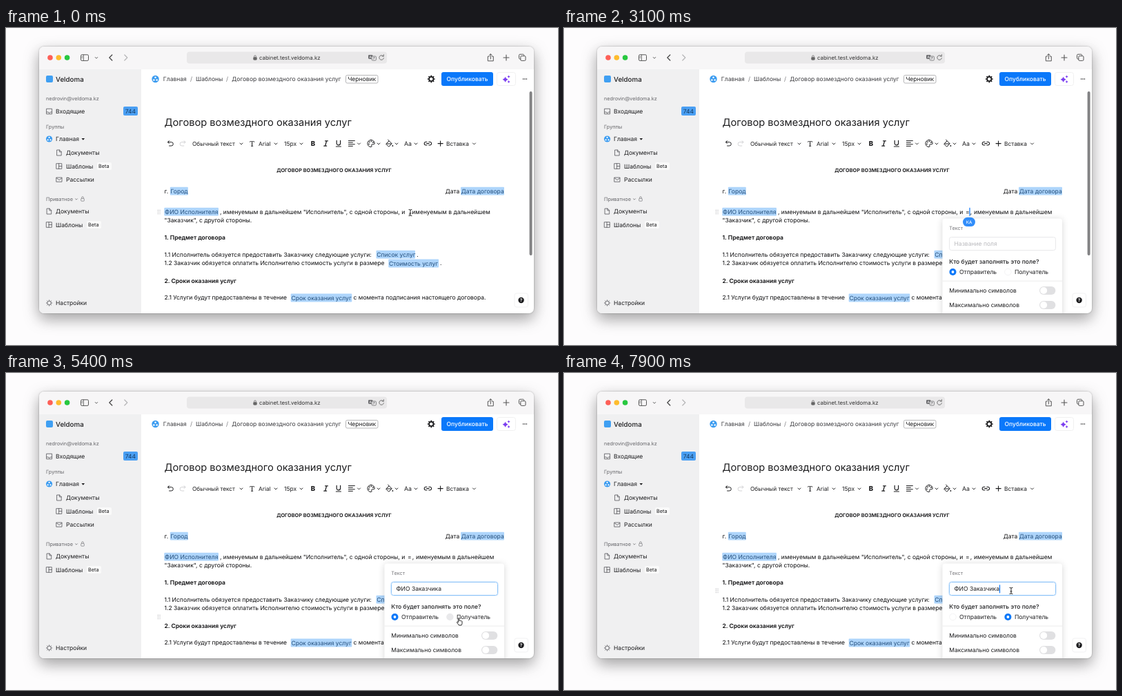
An HTML page that plays this animation: 800 by 460 pixels, repeating every 8000 ms.

```html
<!DOCTYPE html>
<html lang="ru">
<head>
<meta charset="utf-8">
<title>Шаблон договора</title>
<style>
  html, body { margin: 0; width: 800px; height: 460px; overflow: hidden; background: #fdfcfd; }
  svg { display: block; }
  text { font-family: Inter, "Noto Sans", sans-serif; white-space: pre; text-rendering: geometricPrecision; }
  .window { filter: drop-shadow(0 8px 11px rgba(0,0,0,.3)) drop-shadow(0 0 1px rgba(0,0,0,.3)); }
  .panel { filter: drop-shadow(0 1px 5px rgba(0,0,0,.16)); }
</style>
</head>
<body>
<svg id="stage" width="800" height="460" viewBox="0 0 800 460">
  <defs><clipPath id="frame"><rect x="48" y="27" width="717" height="387" rx="7"/></clipPath></defs>
</svg>
<script>
const NS = 'http://www.w3.org/2000/svg';
const LOOP = 8000;
const INK = '#1d1d1f', GREY = '#77777b', BLUE = '#0a78fa', TAG = '#aed5fb';
const BASE = 8.54, SMALL = 7.32;
const stage = document.getElementById('stage');
let parent = stage;

function add(tag, attrs, content) {
  const el = document.createElementNS(NS, tag);
  for (const key in attrs) el.setAttribute(key, attrs[key]);
  if (content !== undefined) el.textContent = content;
  return parent.appendChild(el);
}

function group(attrs, build) {
  const outer = parent;
  const el = parent = add('g', attrs);
  build();
  parent = outer;
  return el;
}

// y is the middle of the capital letters
function label(x, y, str, size = BASE, fill = INK, weight = 400, more = {}) {
  return add('text', { x, y: y + size * .36, 'font-size': size, fill, 'font-weight': weight, ...more }, str);
}

const box = (x, y, width, height, fill, rx = 0, more = {}) =>
  add('rect', { x, y, width, height, fill, rx, ...more });
const dot = (cx, cy, r, fill, more = {}) => add('circle', { cx, cy, r, fill, ...more });
const line = (d, stroke = INK, width = 1, more = {}) =>
  add('path', { d, fill: 'none', stroke, 'stroke-width': width, 'stroke-linecap': 'round', 'stroke-linejoin': 'round', ...more });
const chevron = (x, y, color = INK, s = 2) => line(`M${x - s} ${y - s / 2}l${s} ${s}l${s} ${-s}`, color, .9);

function tag(x, y, w, str) {
  box(x, y - 5.8, w, 11.8, TAG, 1);
  label(x + .8, y + .3, str, BASE, '#244f7c');
}

function gear(x, y, r, color, width) {
  dot(x, y, r * .66, 'none', { stroke: color, 'stroke-width': width });
  for (let i = 0; i < 8; i++) {
    const a = i * Math.PI / 4, c = Math.cos(a), s = Math.sin(a);
    line(`M${x + c * r * .8} ${y + s * r * .8}L${x + c * r} ${y + s * r}`, color, width);
  }
}

function lock(x, y, color, fill = 'none') {
  box(x - 2.3, y - .8, 4.6, 3.8, fill, .7, { stroke: color, 'stroke-width': .7 });
  line(`M${x - 1.4} ${y - 1}v-1a1.4 1.4 0 0 1 2.8 0v1`, color, .7);
}

function people(x, y, r) {
  dot(x, y, r, '#3c9cf0');
  for (const [dx, dy] of [[0, -.45], [-.42, .3], [.42, .3]]) dot(x + dx * r, y + dy * r, r * .24, '#fff');
}

const docIcon = (x, y) => line(`M${x - 3} ${y - 4}h3.6l2.6 2.6v5.4h-6.2zM${x + .4} ${y - 4}v2.8h2.8`, '#55555a', .8);
const gridIcon = (x, y) => line(`M${x - 3.8} ${y - 3.8}h7.6v7.6h-7.6zM${x - .4} ${y - 3.8}v7.6M${x - .4} ${y}h4.2`, '#55555a', .8);

function beta(x, y) {
  box(x, y - 5.5, 21, 11, '#fafafa', 2);
  label(x + 2, y, 'Beta', SMALL);
}

function drawTitleBar() {
  box(48, 27, 717, 33, '#f7f6f7');
  ['#fe5f57', '#febc2e', '#28c840'].forEach((c, i) => dot(64 + i * 12.3, 43, 3.8, c));
  box(108.5, 38.8, 11, 8.6, 'none', 1.6, { stroke: '#555', 'stroke-width': 1 });
  line('M112.4 39v8.2M110 41.3h1M110 43.2h1', '#555', .8);
  chevron(131, 43.3, '#555', 1.8);
  line('M153.8 39l-4 4l4 4', '#444', 1.2);
  line('M171.8 39l4 4l-4 4', '#b5b5b7', 1.2);
  box(262, 34.5, 290, 17, '#e9e8e9', 4);
  lock(361, 43.2, '#666', '#666');
  label(367, 43.3, 'cabinet.test.veldoma.kz', 7.9, '#333');
  box(525, 39, 6.5, 6, '#707073', 1.4);
  box(530, 41, 6.5, 6, '#e9e8e9', 1.4, { stroke: '#707073', 'stroke-width': .8 });
  label(526.4, 42, 'A', 5, '#fff');
  line('M532 43h2.6M533.3 42.2v.8M532 45.6l2-2.4', '#707073', .6);
  line('M547 41.2a3.3 3.3 0 1 0 .4 2.6M545 40.9h2.3v-2.3', '#666', .9);
  line('M700.3 41.2h-2v6.6h8v-6.6h-2M702.3 45v-7M700.3 39.6l2-2l2 2', '#555', 1);
  line('M721 43h8M725 39v8', '#555', 1.1);
  box(743.5, 38.2, 7.2, 6.8, 'none', 1.4, { stroke: '#555' });
  box(745.8, 40.6, 7.2, 6.8, '#f7f6f7', 1.4, { stroke: '#555' });
}

function drawSidebar() {
  box(48, 60, 148, 354, '#f0f0f1');
  box(58, 69, 10, 10, '#3f9ff2', 2);
  label(72, 74, 'Veldoma', 9.76, INK, 500);
  label(58, 102.3, 'nedrovin@veldoma.kz', SMALL, '#66666a');
  line('M59 117.2h7.6v7.6h-7.6zM59 122h2.2l.8 1.2h1.6l.8-1.2h2.2', '#55555a', .8);
  label(72, 121, 'Входящие');
  box(170, 114, 21, 13, '#4a9ff3', 2);
  label(180.4, 120.8, '744', BASE, '#16395f', 400, { 'text-anchor': 'middle' });
  label(58, 143, 'Группы', SMALL, '#66666a');
  people(62.6, 161, 4.6);
  label(72, 161, 'Главная');
  add('path', { d: 'M109.5 160h4.6l-2.3 2.7z', fill: INK });
  docIcon(77, 181);
  label(87, 181, 'Документы');
  gridIcon(77, 200.5);
  label(87, 200.5, 'Шаблоны');
  beta(132, 200.5);
  line('M73.2 217h7.8v6.2h-7.8zM73.2 217.6l3.9 3l3.9-3', '#55555a', .8);
  label(87, 220.3, 'Рассылки');
  label(58, 248.3, 'Приватное', SMALL, '#66666a');
  chevron(102, 248.5, '#77777b', 1.4);
  lock(111, 248.2, '#77777b');
  docIcon(62.5, 266);
  label(72, 266, 'Документы');
  gridIcon(62.5, 285.5);
  label(72, 285.5, 'Шаблоны');
  beta(117, 285.5);
  gear(62.6, 399, 4.2, '#55555a', .8);
  label(72, 399.3, 'Настройки');
}

function drawHeader() {
  people(216.5, 74, 5.2);
  label(227.8, 74, 'Главная', BASE, '#3a3a3e');
  label(267, 74, '/', BASE, GREY);
  label(275, 74, 'Шаблоны', BASE, '#3a3a3e');
  label(319, 74, '/', BASE, GREY);
  label(327.3, 74, 'Договор возмездного оказания услуг', BASE, '#3a3a3e');
  box(492.5, 68.5, 46.5, 11.5, '#fff', 2, { stroke: '#a5a5a8', 'stroke-width': .8 });
  label(515.8, 74.3, 'Черновик', BASE, INK, 400, { 'text-anchor': 'middle' });
  gear(616.3, 74, 4.7, INK, 1.7);
  box(631, 64, 75, 20, BLUE, 3);
  label(668.6, 74, 'Опубликовать', BASE, '#fff', 500, { 'text-anchor': 'middle' });
  box(711.5, 64.5, 27, 19, '#fff', 3, { stroke: '#ececee', 'stroke-width': .8 });
  for (const [x, y, s] of [[723.6, 74.8, 4], [728.6, 70.6, 2.2], [728.6, 78, 2]])
    add('path', { d: `M${x} ${y - s}q${s * .2} ${s * .8} ${s} ${s}q${-s * .8} ${s * .2} ${-s} ${s}q${-s * .2} ${-s * .8} ${-s} ${-s}q${s * .8} ${-s * .2} ${s} ${-s}z`, fill: '#7b3df0' });
  for (let i = 0; i < 3; i++) dot(749.6 + i * 2.4, 74, .8, INK);
}

function drawToolbar() {
  const y = 167.6;
  line('M236.4 163.6l-2 2l2 2M234.6 165.6h5a2.7 2.7 0 0 1 0 5.4h-3');
  line('M258 163.6l2 2l-2 2M259.8 165.6h-5a2.7 2.7 0 0 0 0 5.4h3', '#d2d2d4');
  label(270, y, 'Обычный текст', 8.3);
  label(353.3, y, 'T', 11, INK, 400, { style: 'font-family:"Noto Serif",serif' });
  label(366, y, 'Arial', 8.3);
  label(403, y, '15px', 8.5);
  label(441.8, y, 'B', 9.6, INK, 800);
  line('M462.6 163.8h3.8M460.8 171.2h3.8M464.6 163.8l-2 7.4', INK, 1.3);
  line('M479.2 163.4v3.8a2.7 2.7 0 0 0 5.4 0v-3.8M478.4 172h7', INK, 1.2);
  line('M496.4 163.6h9M496.4 166.2h6M496.4 168.8h9M496.4 171.4h6', INK, 1);
  line('M529 162.4a5 5 0 1 0 0 10.2q1.8-.6.8-2q-.6-1.6 1-1.8h2q1.6-.2 1.4-1.8a5.2 5 0 0 0-5.2-4.6', INK, 1);
  for (const [px, py] of [[526, 168.4], [526.6, 165.4], [529.4, 164.4], [532, 166]]) dot(px, py, .9, INK);
  line('M551 168l4.2-4.2l4 4l-4.2 4.2zM555.2 163.8l-1.6-1.6M551.6 168h7', INK, 1);
  dot(560.4, 171, .9, INK);
  label(577, y, 'Aa', 8.8);
  line('M610 165.2h-1.4a2.4 2.4 0 0 0 0 4.8h1.4M612.8 165.2h1.4a2.4 2.4 0 0 1 0 4.8h-1.4M609.6 167.6h3.6', INK, 1.1);
  line('M626 167.6h7.2M629.6 164v7.2', INK, 1.1);
  label(638, y, 'Вставка', 8.4);
  for (const x of [341, 391, 428, 511.5, 540, 566, 594, 678.5]) chevron(x, 168);
}

const docLine = (x, y, str, weight = 400) => label(x, y, str, BASE, '#0c0c0e', weight);

function drawDocument() {
  label(229.5, 136.3, 'Договор возмездного оказания услуг', 14.64);
  label(475.5, 206.6, 'ДОГОВОР ВОЗМЕЗДНОГО ОКАЗАНИЯ УСЛУГ', SMALL, '#0c0c0e', 600, { 'text-anchor': 'middle' });
  docLine(229.5, 236.6, 'г.');
  tag(237.8, 236.6, 26, 'Город');
  docLine(636.7, 236.6, 'Дата');
  tag(659, 236.6, 63, 'Дата договора');
  tag(229.3, 266.6, 78.7, 'ФИО Исполнителя');
  docLine(310, 266.6, ', именуемым в дальнейшем "Исполнитель", с одной стороны, и');
  docLine(229.5, 279.3, '"Заказчик", с другой стороны.');
  docLine(229.5, 304, '1. Предмет договора', 600);
  docLine(229.5, 328.6, '1.1 Исполнитель обязуется предоставить Заказчику следующие услуги:');
  tag(536.5, 328.6, 56.5, 'Список услуг');
  docLine(595.2, 328.6, '.');
  docLine(229.5, 341.4, '1.2 Заказчик обязуется оплатить Исполнителю стоимость услуги в размере');
  tag(554.3, 341.4, 72.8, 'Стоимость услуг');
  docLine(629, 341.4, '.');
  docLine(229.5, 366.6, '2. Сроки оказания услуг', 600);
  docLine(229.5, 391.4, '2.1 Услуги будут предоставлены в течение');
  tag(412.7, 391.4, 88.6, 'Срок оказания услуг');
  docLine(503.6, 391.4, 'с момента подписания настоящего договора.');
}

const ui = {};

function drawRadio(x, str) {
  dot(x, 354, 4.8, '#fff', { stroke: '#f0f0f2', 'stroke-width': .8 });
  const hover = dot(x, 354, 5, '#e9e9eb');
  const on = group({}, () => { dot(x, 354, 5, BLUE); dot(x, 354, 1.9, '#fff'); });
  label(x + 9.5, 354, str);
  return { hover, on };
}

function drawToggle(y, str) {
  label(558.3, y, str);
  box(689, y - 6, 23.4, 12, '#e0e0e2', 6);
  dot(695.2, y, 5, '#fff');
}

function drawPanel() {
  box(548.5, 276.5, 173.5, 150, '#fff', 4, { class: 'panel' });
  label(558.3, 290.3, 'Текст', SMALL, GREY);
  ui.glow = box(557.5, 302.5, 156, 21, 'none', 4, { stroke: '#e2f0fe', 'stroke-width': 1 });
  ui.field = box(558.5, 303.5, 154, 19, '#fff', 3, { 'stroke-width': 1 });
  ui.hint = label(565.5, 313.3, 'Название поля', BASE, '#b9b9bd');
  ui.value = label(565.5, 313.3, '');
  label(558.3, 338.8, 'Кто будет заполнять это поле?', BASE, INK, 500);
  ui.sender = drawRadio(563.5, 'Отправитель');
  ui.receiver = drawRadio(643.4, 'Получатель');
  box(548.5, 366.7, 173.5, .8, '#e6e6e8');
  drawToggle(381, 'Минимально символов');
  drawToggle(402, 'Максимально символов');
}

group({ class: 'window' }, () => box(48, 27, 717, 387, '#fff', 7));
group({ 'clip-path': 'url(#frame)' }, () => {
  drawTitleBar();
  drawSidebar();
  drawHeader();
  drawToolbar();
  drawDocument();
  ui.equals = docLine(582, 266.6, '=');
  ui.tail = group({}, () => {
    docLine(583.2, 266.6, ',');
    docLine(588.3, 266.6, 'именуемым в дальнейшем');
  });
  ui.handle = group({}, () => {
    for (let i = 0; i < 6; i++) dot(220.4 + i % 2 * 2.6, -2.6 + (i >> 1) * 2.6, .7, '#b4b4b8');
  });
  ui.scrollbar = box(758.6, 92, 4, 238, '#828284', 2);
  ui.panel = group({}, drawPanel);
  box(737, 385, 19.5, 20, '#fff', 3, { stroke: '#eeeeef', 'stroke-width': .8 });
  dot(746.6, 395, 4.2, INK);
  label(746.6, 395, '?', 6.4, '#fff', 700, { 'text-anchor': 'middle' });
});
ui.caret = box(-.6, -6, 1.2, 12, BLUE);
ui.badge = group({}, () => {
  box(-9, -6.7, 18, 13.4, BLUE, 6.7);
  label(0, 0, 'КА', 6.2, '#fff', 500, { 'text-anchor': 'middle' });
});

ui.pointers = {
  beam: group({}, () => {
    const d = 'M-2 -4.6q1.6 0 2 1q.4-1 2-1M0 -3.6v7.2M-2 4.6q1.6 0 2-1q.4 1 2 1M-1 .9h2';
    line(d, '#fff', 2);
    line(d, '#111', .9);
  }),
  hand: group({}, () => add('path', {
    d: 'M-1.6 -4.4q0-1 .8-1q.8 0 .8 1v3q.7-.5 1.4 0q.8-.4 1.4.2q1-.2 1.2.8v2.6q0 1.6-1 2.8h-3.6q-1.2-1.8-2.8-3.8q-.3-1.2 1-1l.8.7z',
    fill: '#fff', stroke: '#111', 'stroke-width': .9, 'stroke-linejoin': 'round' })),
  arrow: group({}, () => add('path', {
    d: 'M-2 -5v9.2l2.1-1.9l1.4 3.2l1.5-.7l-1.4-3.1h2.8z', fill: '#111', stroke: '#fff', 'stroke-width': .7 }))
};

// time, x, y, shape of the mouse pointer
const path = [
  [0, 586, 268, 'beam'], [500, 586, 268, 'beam'], [1100, 582, 267, 'beam'], [2300, 582, 267, ''],
  [3200, 584, 272, 'beam'], [3600, 581.6, 320, 'beam'], [4000, 581.6, 320, ''],
  [5050, 584, 321, 'beam'], [5250, 630, 346, 'hand'], [5400, 657, 361, 'hand'],
  [5950, 657, 361, 'hand'], [6150, 664, 330, 'arrow'], [6400, 668, 288, 'arrow'],
  [6850, 668, 288, 'arrow'], [7050, 660, 304, 'beam'], [7250, 648, 316, 'beam'], [LOOP, 648, 316, 'beam']
];
const TYPED = 'ФИО Заказчика';

const show = (el, on) => el.setAttribute('visibility', on ? 'visible' : 'hidden');
const move = (el, x, y) => el.setAttribute('transform', `translate(${x} ${y})`);
const between = (t, a, b) => t >= a && t < b;
const clamp = (v, lo, hi) => Math.max(lo, Math.min(hi, v));
const blinkOn = age => age % 1000 < 620;

function pointerAt(t) {
  const i = Math.max(0, path.findIndex(p => p[0] > t) - 1);
  const [t0, x0, y0, shape] = path[i], [t1, x1, y1] = path[i + 1];
  const k = (t - t0) / (t1 - t0), e = k * k * (3 - 2 * k);
  return { x: x0 + (x1 - x0) * e, y: y0 + (y1 - y0) * e, shape };
}

function handleY(y) {
  if (y < 285) return 267;
  if (y < 298) return 292;
  return y < 334 ? 316 : 354;
}

function render(t) {
  const mouse = pointerAt(t);
  for (const name in ui.pointers) {
    show(ui.pointers[name], name === mouse.shape);
    move(ui.pointers[name], mouse.x, mouse.y);
  }
  move(ui.handle, 0, handleY(mouse.y));
  ui.scrollbar.setAttribute('opacity', clamp((3450 - t) / 250, 0, 1));

  const equals = t >= 2400, panel = t >= 2700;
  show(ui.equals, equals);
  move(ui.tail, equals ? 5.6 : 0, 0);
  ui.panel.setAttribute('display', panel ? 'inline' : 'none');

  const focus = between(t, 3600, 5700) || t >= 7300;
  const count = clamp(Math.floor((t - 4000) / 75), 0, TYPED.length);
  show(ui.glow, panel && focus);
  ui.field.setAttribute('stroke', focus ? '#8cc3f8' : '#e8e8ea');
  ui.hint.setAttribute('display', count ? 'none' : 'inline');
  ui.value.textContent = TYPED.slice(0, count);

  const chosen = t >= 5700;
  show(ui.sender.on, !chosen);
  show(ui.receiver.on, chosen);
  show(ui.sender.hover, false);
  show(ui.receiver.hover, !chosen && mouse.shape === 'hand' && mouse.y > 350);

  let caret = false, x = 0, y = 0;
  if (between(t, 1500, 3600)) {
    caret = t > 2300 || blinkOn(t - 1500);
    x = equals ? 588 : 582;
    y = 266.8;
  } else if (focus) {
    caret = t < 5000 || blinkOn(t < 5700 ? t - 4600 : t - 7300);
    x = 566 + (count ? ui.value.getComputedTextLength() : 0);
    y = 313.4;
  }
  show(ui.caret, caret);
  move(ui.caret, x, y);
  show(ui.badge, between(t, 2400, 3250) || between(t, 3600, 4100));
  ui.badge.setAttribute('opacity', between(t, 2900, 3250) ? .84 : 1);
  move(ui.badge, x - 1, y + 14.6);
}

const start = performance.now();
function tick() {
  render((performance.now() - start) % LOOP);
  requestAnimationFrame(tick);
}
render(0);
requestAnimationFrame(tick);
</script>
</body>
</html>
```
